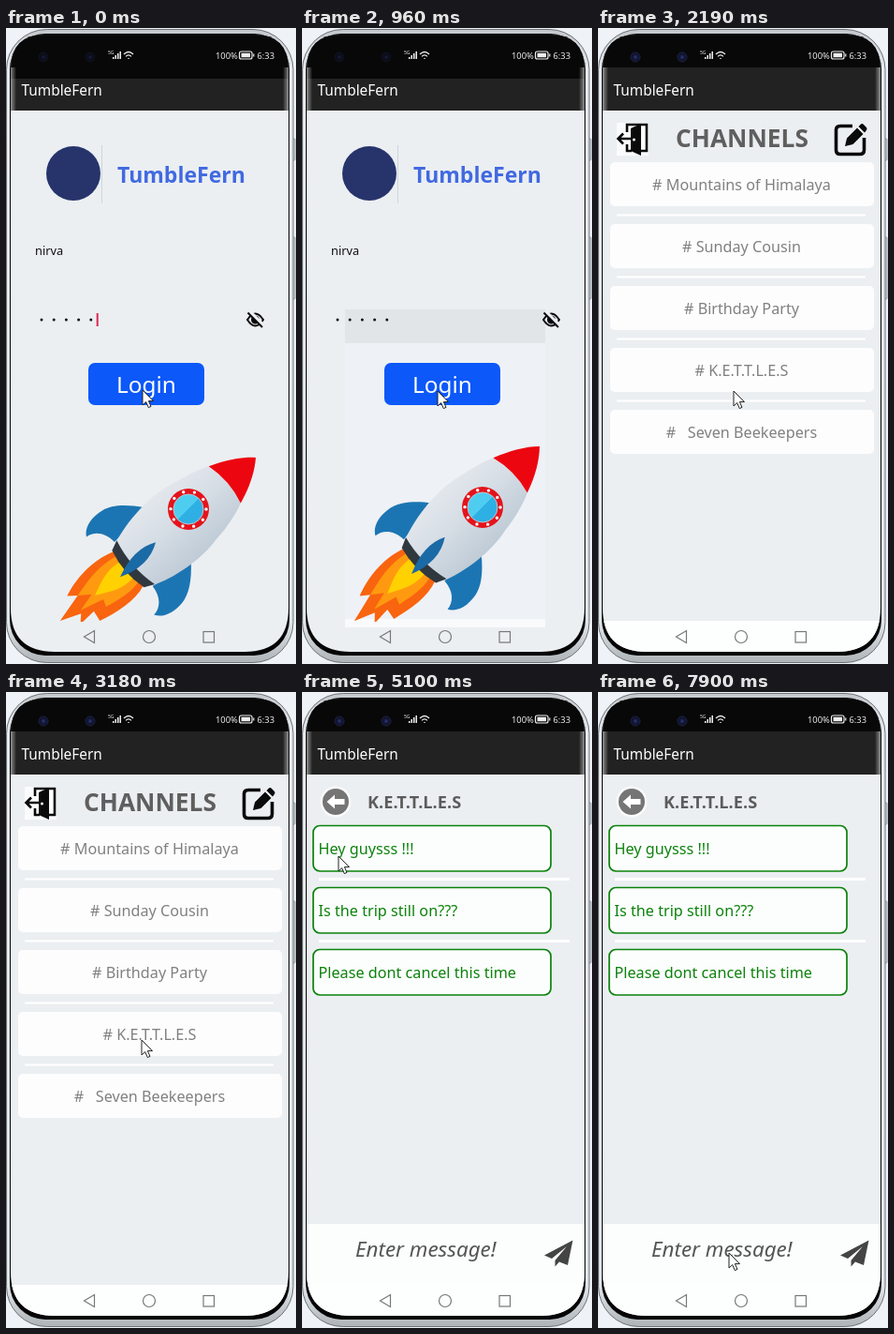
Recreate the animation shown at these times as an HTML page. Size 310 by 678 pixels, loop 8 s.

```html
<!DOCTYPE html>
<html lang="en">
<head>
<meta charset="utf-8">
<title>Chat app demo</title>
<style>
  html, body { margin: 0; width: 310px; height: 678px; overflow: hidden; background: #eff3f7; }
  svg { display: block; font-family: "Noto Sans", "Open Sans", sans-serif; }
  text { white-space: pre; }
</style>
</head>
<body>
<svg id="stage" width="310" height="678" viewBox="0 0 310 678">
  <defs>
    <clipPath id="screenClip">
      <path d="M5 44Q5 7 42 7H265Q302 7 302 44V618Q302 665 255 665H52Q5 665 5 618Z"/>
    </clipPath>
    <clipPath id="imageClip"><rect x="40" y="440" width="232" height="193"/></clipPath>
    <linearGradient id="rim" x2="0" y2="1">
      <stop offset="0" stop-color="#c3c7cb"/><stop offset=".06" stop-color="#e6eaee"/>
      <stop offset=".94" stop-color="#dfe4e8"/><stop offset="1" stop-color="#aeb3b8"/>
    </linearGradient>
    <linearGradient id="edge">
      <stop offset="0" stop-color="#fff" stop-opacity=".5"/>
      <stop offset="1" stop-color="#fff" stop-opacity="0"/>
    </linearGradient>
    <linearGradient id="hull" x2="0" y2="1">
      <stop offset="0" stop-color="#e3e7ec"/><stop offset=".45" stop-color="#d5dde5"/>
      <stop offset="1" stop-color="#bfcbd6"/>
    </linearGradient>
    <linearGradient id="glass" x2="1" y2="1">
      <stop offset=".5" stop-color="#4fcdf1"/><stop offset=".5" stop-color="#2fb0e4"/>
    </linearGradient>
  </defs>

  <!-- phone body -->
  <g stroke="#9298a0" fill="#cfd5da">
    <rect x="305" y="118" width="4" height="23" rx="1"/>
    <rect x="305" y="223" width="4" height="66" rx="1"/>
  </g>
  <rect x=".5" y="1.5" width="306.500" height="675" rx="43" fill="url(#rim)" stroke="#6d7277"/>
  <rect x="4" y="6" width="299" height="663" rx="38" fill="#050505"/>

  <g clip-path="url(#screenClip)">
    <rect x="5" y="7" width="297" height="660" fill="#ebeff2"/>

    <g id="login">
      <g id="patch">
        <rect x="46" y="336" width="214" height="294" fill="#eef1f6"/>
        <rect x="46" y="300" width="214" height="36" fill="#e2e5e8"/>
        <rect x="46" y="630" width="214" height="9" fill="#f8fafb"/>
      </g>
      <circle cx="72" cy="155" r="29" fill="#27346b"/>
      <path d="M102.500 125V187" stroke="#cdd6de"/>
      <text x="119" y="165" font-size="23" font-weight="700" fill="#4169e1">TumbleFern</text>
      <text x="31" y="242" font-size="12.800" fill="#111">nirva</text>
      <g id="dots" fill="#111"></g>
      <path id="caret" d="M97.700 304V318" stroke="#e0254f" stroke-width="2"/>
      <g fill="none" stroke="#0a0a0a" stroke-width="2">
        <path d="M258 311Q266.500 298 275 311Q266.500 324 258 311Z"/>
        <circle cx="266.500" cy="311" r="3.500" fill="#0a0a0a"/>
        <path d="M260 302L276 318" stroke="#ebeff2" stroke-width="4"/>
        <path d="M258.500 303.500L274 319"/>
      </g>
      <rect x="88" y="357" width="124" height="45" rx="7" fill="#0c58f8"/>
      <text x="118" y="388.500" font-size="24.400" fill="#fff">Login</text>
      <g clip-path="url(#imageClip)">
        <g id="rocket">
          <path d="M-180-24C-205-33-232-28-249-21L-240-14L-272-6L-250 3L-258 11L-238 10L-240 22C-220 27-198 31-180 24Z" fill="#f9640f"/>
          <path d="M-180-18C-205-24-222-18-240-14L-228-5L-248 0L-222 7L-225 15C-206 19-193 21-180 17Z" fill="#ff9a10"/>
          <path d="M-180-11C-200-15-212-8-226-2C-212 5-199 14-180 10Z" fill="#ffd100"/>
          <g id="fins" fill="#1c75b3"></g>
          <path d="M-172-30C-145-40-110-44-83-37C-64-33-50-29-44-26Q-37 0-44 26C-52 30-70 36-89 38C-115 44-150 40-174 30Q-180 0-172-30Z" fill="url(#hull)"/>
          <path d="M0 0C-10-10-26-19-44-26Q-37 0-44 26C-26 20-10 10 0 0Z" fill="#ec0710"/>
          <path d="M-170-31L-181-26Q-188 0-181 26L-170 31Q-178 0-170-31Z" fill="#30383f"/>
          <path d="M-140-2Q-162-13-193 1Q-162 13-140-2Z" fill="#1a6aa6"/>
        </g>
        <g id="porthole">
          <circle r="22" fill="#e5131b"/>
          <circle r="19" fill="none" stroke="#fff" stroke-width="3.400" stroke-linecap="round" stroke-dasharray="0 11.938"/>
          <circle r="16" fill="url(#glass)" stroke="#b9c6d0"/>
        </g>
      </g>
    </g>

    <g id="channels">
      <rect x="20" y="101" width="34" height="35" fill="#fafbfc"/>
      <g fill="none" stroke="#0a0a0a" stroke-width="2.600">
        <path d="M31 111V103H52V131H44M31 124V131H36"/>
        <path d="M41 118H22M27 112.500L21.500 118L27 123.500"/>
      </g>
      <path d="M35 107L46 102V136L35 131Z" fill="#0a0a0a"/>
      <circle cx="38.500" cy="119" r="1.500" fill="#fff"/>
      <text x="154" y="127" text-anchor="middle" font-size="26.300" font-weight="700" fill="#5f5f5f">CHANNELS</text>
      <path d="M272 104.500H259Q254.500 104.500 254.500 109V130Q254.500 134.500 259 134.500H280Q284.500 134.500 284.500 130V117" fill="none" stroke="#0a0a0a" stroke-width="3.600"/>
      <path d="M264 126L266 117.500L277 106.500L283.500 113L272.500 124ZM278.500 105L281 102.500Q282.500 101.500 284 103L287 106Q288 107.500 287 109L285 111.500Z" fill="#0a0a0a"/>
      <g id="cards"></g>
    </g>

    <g id="chat">
      <circle cx="36" cy="117" r="16.500" fill="#fafbfb"/>
      <circle cx="36" cy="117" r="14" fill="#757575"/>
      <path d="M26.500 117L35 109.500V114H45.500V120H35V124.500Z" fill="#fff"/>
      <text x="70" y="123.500" font-size="18.200" font-weight="700" fill="#5c5c5c">K.E.T.T.L.E.S</text>
      <g id="bubbles"></g>
      <rect x="5" y="567" width="297" height="66" fill="#fcfdfd"/>
      <text x="57" y="602" font-size="22.400" font-style="italic" fill="#555">Enter message!</text>
      <path d="M289.500 584.500L259 600.500L267 604L283 591L270.500 606V612.500L275 607.500L284 611Z" fill="#444"/>
    </g>

    <rect id="navBar" x="5" y="632" width="297" height="35" fill="#fdfefe"/>
    <g fill="none" stroke="#777" stroke-width="1.200">
      <path d="M94.500 642.500V655.500L83.500 649Z"/>
      <circle cx="153" cy="649" r="6.500"/>
      <rect x="211" y="643.500" width="11.500" height="11.500"/>
    </g>

    <rect x="5" y="7" width="297" height="81" fill="#222"/>
    <rect id="statusBar" x="5" y="7" width="297" height="35" fill="#080808"/>
    <rect x="5" y="42" width="6" height="46" fill="url(#edge)"/>
    <rect x="5" y="42" width="6" height="46" fill="url(#edge)" transform="matrix(-1 0 0 1 307 0)"/>
    <text x="16.500" y="72" font-size="15.400" fill="#fff">TumbleFern</text>
    <g id="lenses" fill="#10142f" stroke="#1b2040"></g>
    <g fill="#eee">
      <text x="109" y="28" font-size="5">5G</text>
      <path d="M114 33V31H115.500V33ZM116.500 33V29H118V33ZM119 33V27H120.500V33ZM121.500 33V25H123V33Z"/>
      <text x="224" y="32.500" font-size="9.300">100%</text>
      <text x="268.500" y="32.500" font-size="9.300">6:33</text>
    </g>
    <g fill="none" stroke="#eee" stroke-width="1.200">
      <path d="M126 28Q131 23 136 28M128 30.300Q131 27.300 134 30.300M130.300 32.500H131.700"/>
      <rect x="249.500" y="25" width="13.500" height="8" rx="2"/>
      <path d="M264.800 27.500V30.500"/>
      <path d="M251.500 29H261" stroke-width="4.500"/>
    </g>
  </g>

  <path id="pointer" d="M0 0V16L3.700 12.600L6.300 18.600L9 17.400L6.400 11.600H11.500Z" fill="#fff" stroke="#222" stroke-linejoin="round"/>
</svg>

<script>
const LOOP = 8000, CHANNELS_AT = 1110, CHAT_AT = 4440, ROW = 66;
const $ = id => document.getElementById(id);
const show = (id, on) => $(id).setAttribute("display", on ? "inline" : "none");
const place = (id, x, y, angle = 0) =>
  $(id).setAttribute("transform", `translate(${x} ${y}) rotate(${angle})`);
const mix = (a, b, p) => a + (b - a) * p;
const smooth = p => p * p * (3 - 2 * p);
const progress = (t, from, to) => Math.min(1, Math.max(0, (t - from) / (to - from)));

const rooms = ["# Mountains of Himalaya", "# Sunday Cousin", "# Birthday Party",
  "# K.E.T.T.L.E.S", "#\u00a0\u00a0\u00a0Seven Beekeepers"];
const messages = ["Hey guysss !!!", "Is the trip still on???", "Please dont cancel this time"];

// time, x, y of the pointer tip
const pointerPath = [
  [0, 146, 386], [150, 146, 386], [960, 145, 387], [2340, 145, 387],
  [3180, 145, 371], [3330, 143, 363], [3480, 143, 362], [3899, 143, 362],
  [3900, 141, 361], [4440, 141, 361], [5100, 39, 175], [5370, 59, 173],
  [5520, 62, 175], [6510, 160, 314], [6760, 170, 407], [7360, 141, 594],
  [7899, 141, 594], [7900, 140, 598], [LOOP, 140, 598]
];

function pointerAt(t) {
  const i = pointerPath.findIndex(key => key[0] > t);
  const [t0, x0, y0] = pointerPath[i - 1], [t1, x1, y1] = pointerPath[i];
  const p = smooth(progress(t, t0, t1));
  return [mix(x0, x1, p), mix(y0, y1, p)].map(Math.round);
}

function build() {
  const divider = (x, y, width) =>
    `<path d="M${x} ${y}H286" stroke="#fff" stroke-width="${width}"/>`;

  $("dots").innerHTML = [0, 1, 2, 3, 4]
    .map(i => `<circle cx="${38 + i * 13.2}" cy="311" r="1.5"/>`).join("");

  $("fins").innerHTML = [1, -1].map(side =>
    `<path transform="scale(1 ${side})" d="M-124-37C-138-55-150-63-160-65C-176-68-188-63-192-55C-182-54-174-46-173-31Z"/>`).join("");

  $("lenses").innerHTML = [40, 90]
    .map(x => `<circle cx="${x}" cy="31" r="5"/><circle cx="${x}" cy="31" r="2" fill="#26306e"/>`).join("");

  $("cards").innerHTML = rooms.map((name, i) => {
    const y = 143 + i * ROW;
    return `<rect x="13" y="${y}" width="282" height="47" rx="5" fill="#fdfdfe"/>
      <text x="153.5" y="${y + 30}" text-anchor="middle" font-size="16.2" fill="#808080">${name}</text>`
      + (i < rooms.length - 1 ? divider(20, y + 56.5, 2) : "");
  }).join("");

  $("bubbles").innerHTML = messages.map((line, i) => {
    const y = 142.5 + i * ROW;
    return `<rect x="12" y="${y}" width="254" height="48.5" rx="7" fill="#fcfdfd" stroke="#0b820b" stroke-width="1.7"/>
      <text x="17.5" y="${y + 30.5}" font-size="16.2" fill="#0b820b">${line}</text>`
      + (i < messages.length - 1 ? divider(18, y + 57, 3) : "");
  }).join("");
}

function render(t) {
  const login = t < CHANNELS_AT, chat = t >= CHAT_AT;
  show("login", login);
  show("channels", !login && !chat);
  show("chat", chat);
  show("navBar", !login);
  show("caret", t < 500);
  show("patch", t >= 840);
  $("statusBar").setAttribute("height", login ? 47 : 35);
  $("lenses").setAttribute("opacity", login ? 0.45 : 1);

  const tilt = smooth(progress(t, 150, 960));
  place("rocket", mix(267, 254, tilt), mix(458, 446, tilt), mix(-41, -44.5, tilt));
  place("porthole", mix(195, 193, tilt), mix(513, 511, tilt));
  place("pointer", ...pointerAt(t));
}

build();
const start = performance.now();
function frame() {
  render((performance.now() - start) % LOOP);
  requestAnimationFrame(frame);
}
frame();
</script>
</body>
</html>
```
